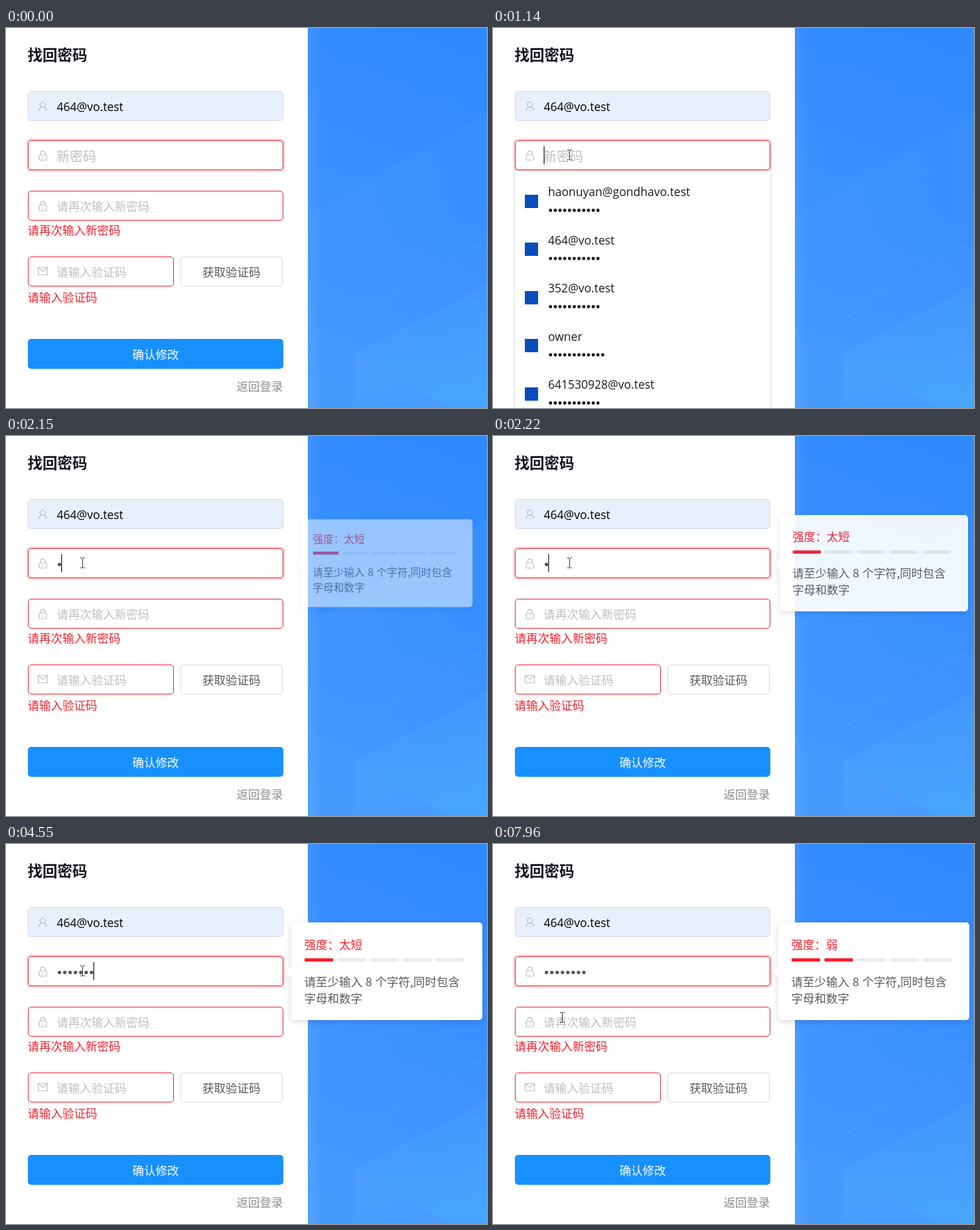
An HTML page for the animation above (8000 ms loop, 725 by 572 pixels).

```html
<!DOCTYPE html>
<html lang="zh-CN">
<head>
<meta charset="utf-8">
<title>找回密码</title>
<style>
html, body { margin: 0; width: 100%; height: 100%; overflow: hidden; background: #fff; }
svg { display: block; width: 725px; height: 572px; }
text { font: 300 17.5px "Noto Sans CJK SC", "Noto Sans CJK", sans-serif; fill: #595959; }
text.title { font-size: 22.5px; font-weight: 700; fill: #15171f; }
text.hint { fill: #bfbfbf; }
text.error { fill: #f5222d; }
text.latin { font-family: "Open Sans", sans-serif; font-weight: 400; fill: #1c1c1c; }
.box { fill: #fff; stroke: #d9d9d9; }
.bad { stroke: #dc2630; }
.icon { fill: none; stroke: #bfbfbf; stroke-width: 1.2; }
</style>
</head>
<body>
<svg viewBox="0 0 725 572">
  <defs>
    <linearGradient id="sky" gradientUnits="userSpaceOnUse" x1="690" y1="0" x2="480" y2="540">
      <stop offset="0" stop-color="#2f89ff"/>
      <stop offset=".5" stop-color="#3b91ff"/>
      <stop offset="1" stop-color="#489aff"/>
    </linearGradient>
    <linearGradient id="edge">
      <stop offset="0" stop-color="#fff" stop-opacity=".06"/>
      <stop offset="1" stop-color="#fff" stop-opacity="0"/>
    </linearGradient>
    <linearGradient id="beam" gradientUnits="userSpaceOnUse" x1="640" y1="175" x2="690" y2="265">
      <stop offset="0" stop-color="#5aa8ff" stop-opacity=".1"/>
      <stop offset="1" stop-color="#5aa8ff" stop-opacity="0"/>
    </linearGradient>
    <linearGradient id="top" gradientUnits="userSpaceOnUse" x1="640" y1="400" x2="690" y2="572">
      <stop offset="0" stop-color="#4aa2ff" stop-opacity=".25"/>
      <stop offset="1" stop-color="#46a6ff" stop-opacity=".95"/>
    </linearGradient>
    <linearGradient id="side" x2="0" y2="1">
      <stop offset="0" stop-color="#58a8ff" stop-opacity=".5"/>
      <stop offset="1" stop-color="#58a8ff" stop-opacity=".1"/>
    </linearGradient>
    <linearGradient id="fade" gradientUnits="userSpaceOnUse" x1="528" y1="429" x2="610" y2="475">
      <stop offset="0" stop-color="#6ab2ff" stop-opacity=".6"/>
      <stop offset="1" stop-color="#6ab2ff" stop-opacity="0"/>
    </linearGradient>
    <filter id="shade" x="-10%" y="-15%" width="120%" height="135%">
      <feDropShadow dx="0" dy="2.5" stdDeviation="5" flood-color="#000" flood-opacity=".15"/>
    </filter>
    <filter id="lift" x="-3%" y="-3%" width="106%" height="106%">
      <feDropShadow dx="0" dy="1" stdDeviation="1.3" flood-color="#000" flood-opacity=".35"/>
    </filter>
    <g id="lock" class="icon">
      <rect x="-5.5" y="-1" width="11" height="8" rx="1"/>
      <path d="M-3.3-1v-2.5a3.3 3.3 0 0 1 6.6 0V-1M0 2v2.5"/>
    </g>
  </defs>

  <rect width="455" height="572" fill="#fff"/>
  <rect x="455" width="270" height="572" fill="url(#sky)"/>
  <path d="M725 127L455 283V572H725Z" fill="url(#beam)"/>
  <rect x="455" width="22" height="572" fill="url(#edge)"/>
  <path d="M528 490L725 385V572H670Z" fill="url(#top)"/>
  <path d="M528 490L670 572H528Z" fill="url(#side)"/>
  <path d="M528 429L711 328L725 336" fill="none" stroke="#6ab2ff" stroke-opacity=".45"/>
  <path d="M528 429L610 475" fill="none" stroke="url(#fade)"/>

  <text class="title" x="32.5" y="48.5">找回密码</text>

  <rect class="box" x="33.5" y="95.5" width="384" height="44" rx="4.5" style="fill:#e8f0fe;stroke:#d3d9e4"/>
  <g class="icon" transform="translate(55.5 118)" style="stroke:#b6bbc6">
    <circle cy="-2.5" r="4"/><path d="M-6 7a6 6 0 0 1 12 0"/>
  </g>
  <text class="latin" x="76.5" y="125" style="fill:#000">464@vo.test</text>

  <rect x="30.5" y="166.5" width="390" height="50" rx="7" fill="#fdd3d5"/>
  <rect class="box bad" x="33.5" y="169.5" width="384" height="44" rx="4.5"/>
  <use href="#lock" x="55.5" y="192"/>
  <text id="hint" class="hint" x="76" y="200.5" style="font-size:20px">新密码</text>
  <g id="dots" fill="#555"></g>
  <rect id="caret" y="178" width="1.3" height="27" fill="#222"/>

  <rect class="box bad" x="33.5" y="245.5" width="384" height="44" rx="4.5"/>
  <use href="#lock" x="55.5" y="268"/>
  <text class="hint" x="76.2" y="275">请再次输入新密码</text>
  <text class="error" x="32.5" y="311">请再次输入新密码</text>

  <rect class="box" x="33.5" y="344.5" width="219" height="44" rx="4.5" style="stroke:#f0242e"/>
  <path class="icon" d="M48.5 360.5h14v11h-14zl7 6 7-6"/>
  <text class="hint" x="76.2" y="374">请输入验证码</text>
  <rect class="box" x="263.5" y="344.5" width="153" height="44" rx="4.5"/>
  <text x="296" y="374">获取验证码</text>
  <text class="error" x="32.5" y="412">请输入验证码</text>

  <rect x="33" y="468" width="385" height="45" rx="5" fill="#1890ff"/>
  <text x="190.5" y="498" style="fill:#fff">确认修改</text>
  <text x="347.5" y="546" style="fill:#8c8c8c">返回登录</text>

  <g id="menu">
    <rect x="33" y="215.5" width="385" height="380" rx="2" fill="#fff" filter="url(#lift)"/>
  </g>

  <g id="tip">
    <path d="M435 118H713a5 5 0 0 1 5 5V260a5 5 0 0 1-5 5H435a5 5 0 0 1-5-5V201l-8-9 8-9V123a5 5 0 0 1 5-5Z"
          fill="#fff" filter="url(#shade)"/>
    <text id="level" class="error" x="449.5" y="158"></text>
    <g id="bars"></g>
    <text x="449.5" y="213.5" word-spacing="1">请至少输入 8 个字符,同时包含</text>
    <text x="449.5" y="239">字母和数字</text>
  </g>

  <g id="cursor">
    <path id="arrow" d="M0 0V16l3.7-3.4 2.5 5.7 2.4-1-2.5-5.6H11Z" fill="#fff" stroke="#000"/>
    <path id="beamCursor" d="M-3-7.5h2.2L.5-6.5 1.8-7.5H4M.5-6.5V7M-3 7.5h2.2L.5 6.5 1.8 7.5H4" fill="none" stroke="#2a332a"/>
  </g>
</svg>
<script>
const LOOP = 8000;
const $ = id => document.getElementById(id);

// Each row: start time, then the value held from then on.
const typed = [[0, 0], [2150, 1], [2300, 2], [2680, 3], [3310, 4], [3630, 5], [3940, 6], [4550, 7], [5010, 8]];
const zoom = [[0, 0], [2150, .485], [2220, .93], [2300, .99], [2380, 1]];
const blink = [1050, 1600, 2150, 3230, 3310, 4470, 4550, 5560, 6110, 6640, 7190, 7660];
const pointer = [
  [290, 426, 507], [370, 405, 486], [445, 360, 437], [520, 300, 371], [595, 255, 322],
  [670, 225, 289], [745, 186, 245], [820, 155, 226], [900, 133, 207], [975, 119, 196],
  [1050, 115, 191], [7810, 114, 199], [7880, 109, 232], [7960, 104, 261]
];
const accounts = [
  ["haonuyan@gondhavo.test", 11], ["464@vo.test", 11], ["352@vo.test", 11],
  ["owner", 12], ["641530928@vo.test", 11]
];

function add(parent, tag, attrs, text = "") {
  const el = document.createElementNS("http://www.w3.org/2000/svg", tag);
  for (const k in attrs) el.setAttribute(k, attrs[k]);
  el.textContent = text;
  return parent.appendChild(el);
}

function addDots(parent, n, x, y, gap, r) {
  return Array.from({ length: n }, (_, i) => add(parent, "circle", { cx: x + i * gap, cy: y, r }));
}

const show = (el, on) => { el.style.display = on ? "" : "none"; };
const held = (rows, t) => rows.filter(r => r[0] <= t).pop();

accounts.forEach(([name, n], i) => {
  const y = 72.5 * i;
  add($("menu"), "rect", { x: 48, y: Math.floor(251 + y), width: 20, height: 20, fill: "#0a4cb8" });
  add($("menu"), "text", { x: 83, y: 253 + y, class: "latin" }, name);
  addDots($("menu"), n, 86.7, 274.5 + y, 7.15, 2.4);
});
const dots = addDots($("dots"), 8, 80.6, 193.3, 8.05, 2.6);
const bars = [0, 1, 2, 3, 4].map(i =>
  add($("bars"), "rect", { x: 450 + 49.5 * i, y: 172, width: 43, height: 5, rx: 1 }));

function render(t) {
  const n = held(typed, t)[1];
  dots.forEach((d, i) => show(d, i < n));
  show($("hint"), !n);
  show($("caret"), blink.filter(b => b <= t).length % 2);
  $("caret").setAttribute("x", n ? 75 + 8.1 * n : 76.4);
  show($("menu"), t >= 1140 && t < 2150);

  const p = held(zoom, t)[1];
  show($("tip"), p);
  $("tip").setAttribute("opacity", p);
  $("tip").setAttribute("transform", `translate(574 191.5) scale(${.8 + .2 * p}) translate(-574 -191.5)`);
  const strong = n > 7;
  $("level").textContent = "强度：" + (strong ? "弱" : "太短");
  bars.forEach((b, i) => b.setAttribute("fill", i <= strong ? "#f5222d" : "#ebebeb"));

  const pos = held(pointer, t);
  show($("cursor"), pos);
  if (!pos) return;
  const [, x, y] = pos;
  const overField = (y > 168 && y < 215) || (y > 244 && y < 291);
  $("cursor").setAttribute("transform", `translate(${x} ${y})`);
  show($("beamCursor"), overField);
  show($("arrow"), !overField);
}

const start = performance.now();
function tick() {
  render((performance.now() - start) % LOOP);
  requestAnimationFrame(tick);
}
tick();
</script>
</body>
</html>
```
